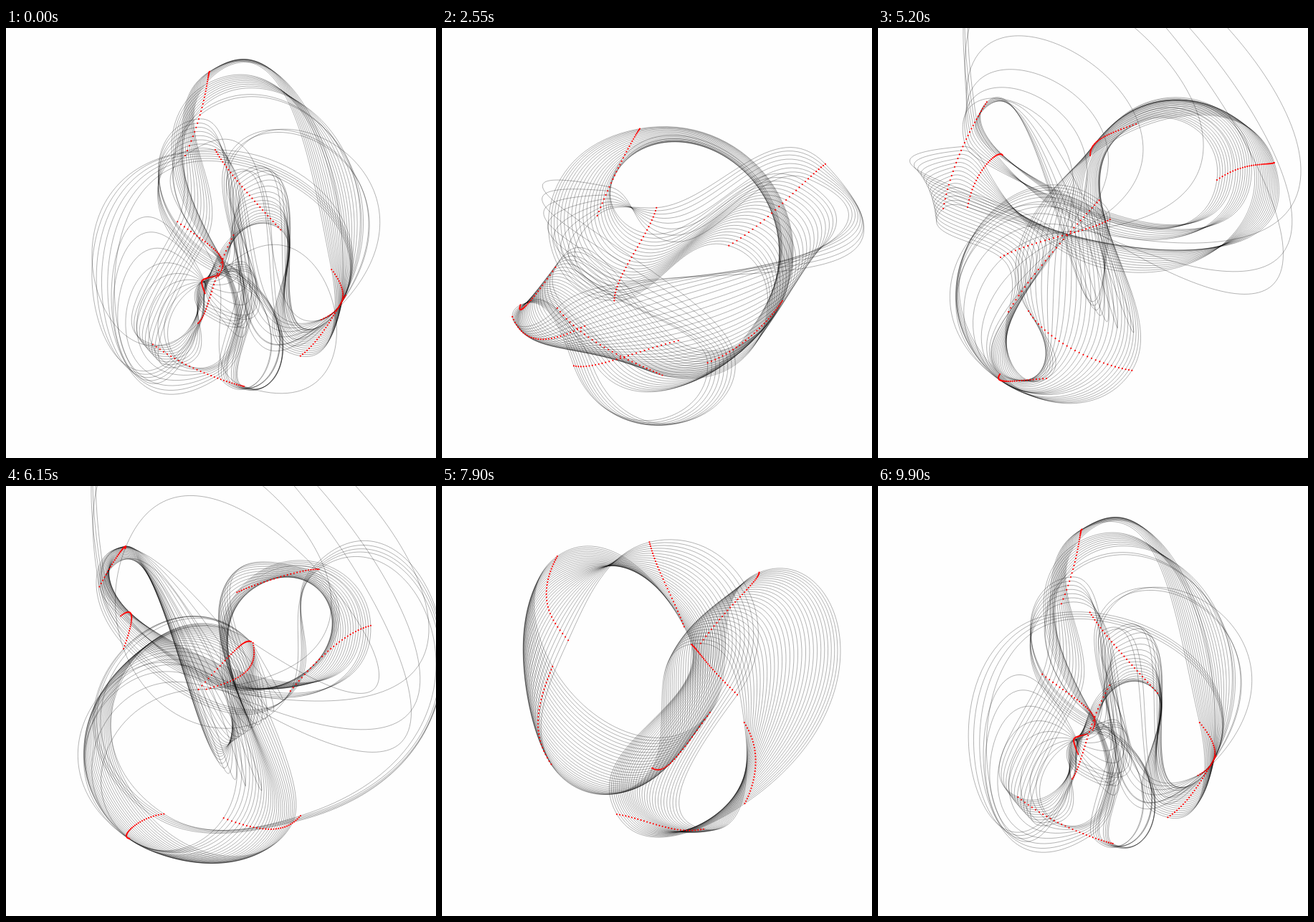
Animation, 600 px wide and 600 px high, one loop 9.95 s. Source, as an HTML page:

```html
<!DOCTYPE html>
<html lang="en">
<head>
<meta charset="utf-8">
<title>Curve trails</title>
<style>
  html, body { margin: 0; width: 100%; height: 100%; overflow: hidden; background: #fefefe; }
  svg { display: block; width: 100%; height: 100%; }
</style>
</head>
<body>
<svg id="stage" viewBox="0 0 600 600" fill="none" stroke-linecap="round"></svg>
<script>
const STEP = 50, FRAMES = 199, STATES = 200, TRAIL = 30, SEG = 25;

// Eight knots in curve order; each passes eight key points on a closed route.
const routes = [
  "268,412 242,369 298,255 296,178 343,140 440,117 391,182 307,311",
  "297,345 417,293 532,192 553,188 488,203 389,296 309,394 275,363",
  "332,500 295,479 165,396 125,250 170,176 161,235 136,351 225,455",
  "296,346 184,423 100,407 91,252 144,116 165,90 151,178 258,284",
  "250,178 147,350 109,388 171,320 309,274 343,212 298,105 283,64",
  "440,407 312,441 187,472 182,396 295,255 344,218 386,265 463,350",
  "474,373 470,388 376,465 235,489 168,488 228,457 333,480 423,447",
  "292,170 273,145 219,256 210,395 336,474 415,455 435,361 369,266"
].map(r => r.split(" ").map(p => p.split(",").map(Number)));

const K = routes.length;
const next = i => (i + 1) % K;
const prev = i => (i + K - 1) % K;

// Relaxes a cyclic, diagonally dominant system.
function relax(rule) {
  const v = new Array(K).fill(0);
  for (let n = 0; n < 50; n++) {
    for (let i = 0; i < K; i++) v[i] = rule(v[prev(i)], v[next(i)], i);
  }
  return v;
}

// Periodic cubic spline with continuous acceleration.
function spline(p) {
  const m = relax((a, b, i) => (3 * (p[next(i)] - p[prev(i)]) - a - b) / 4);
  return t => {
    const i = Math.floor(t / SEG) % K, j = next(i);
    const u = (t % SEG) / SEG, w = 1 - u;
    return w * w * (1 + 2 * u) * p[i] + u * u * (3 - 2 * u) * p[j]
         + u * w * w * m[i] - u * u * w * m[j];
  };
}

const movers = routes.map(r => [0, 1].map(axis => spline(r.map(p => p[axis]))));

// Handle length relative to the chord, for a smooth, round curve.
function reach(a, b) {
  const sa = Math.sin(a), sb = Math.sin(b), ca = Math.cos(a), cb = Math.cos(b);
  const r5 = Math.sqrt(5);
  const top = 2 + Math.SQRT2 * (sa - sb / 16) * (sb - sa / 16) * (ca - cb);
  const low = 3 * (1 + (r5 - 1) / 2 * ca + (3 - r5) / 2 * cb);
  return low * 4 <= top ? 4 : top / low;
}

const fix = v => v.toFixed(2);

// Closed curve through the knots, with angles that balance mock curvature.
function closedCurve(pts) {
  const chords = pts.map((p, i) => {
    const q = pts[next(i)], x = q[0] - p[0], y = q[1] - p[1];
    return { len: Math.hypot(x, y) || 1e-6, dir: Math.atan2(y, x) };
  });
  const turn = chords.map((c, i) => {
    const d = c.dir - chords[prev(i)].dir;
    return Math.atan2(Math.sin(d), Math.cos(d));
  });
  const theta = relax((a, b, i) => {
    const before = 1 / chords[prev(i)].len, after = 1 / chords[i].len;
    return -(before * (a + 2 * turn[i]) + after * (b + turn[next(i)]))
         / (2 * (before + after));
  });
  let d = "M" + pts[0].map(fix).join(" ");
  chords.forEach((c, i) => {
    const j = next(i), p = pts[i], q = pts[j];
    const out = theta[i], into = -theta[j] - turn[j];
    const h1 = c.len * reach(out, into), h2 = c.len * reach(into, out);
    const a1 = c.dir + out, a2 = c.dir - into;
    d += "C" + [
      p[0] + h1 * Math.cos(a1), p[1] + h1 * Math.sin(a1),
      q[0] - h2 * Math.cos(a2), q[1] - h2 * Math.sin(a2),
      q[0], q[1]
    ].map(fix).join(" ");
  });
  return d + "Z";
}

const states = Array.from({ length: STATES }, (_, t) => {
  const pts = movers.map(([x, y]) => [x(t), y(t)]);
  return {
    curve: closedCurve(pts),
    dots: pts.map(p => "M" + p.map(fix).join(" ") + "h0").join("")
  };
});

const stage = document.getElementById("stage");
function addPath(color, width) {
  const el = document.createElementNS("http://www.w3.org/2000/svg", "path");
  el.setAttribute("stroke", color);
  el.setAttribute("stroke-width", width);
  return stage.appendChild(el);
}
const lines = Array.from({ length: TRAIL }, () => addPath("#000", 0.3));
const dots = addPath("#f00", 2.2);

let shown = -1;
function draw(ms) {
  const frame = Math.floor(ms / STEP) % FRAMES;
  if (frame === shown) return;
  shown = frame;
  let marks = "";
  lines.forEach((line, i) => {
    const s = states[(frame - i + STATES) % STATES];
    line.setAttribute("d", s.curve);
    marks += s.dots;
  });
  dots.setAttribute("d", marks);
}

const start = performance.now();
function tick() {
  draw(performance.now() - start);
  requestAnimationFrame(tick);
}
tick();
</script>
</body>
</html>
```
